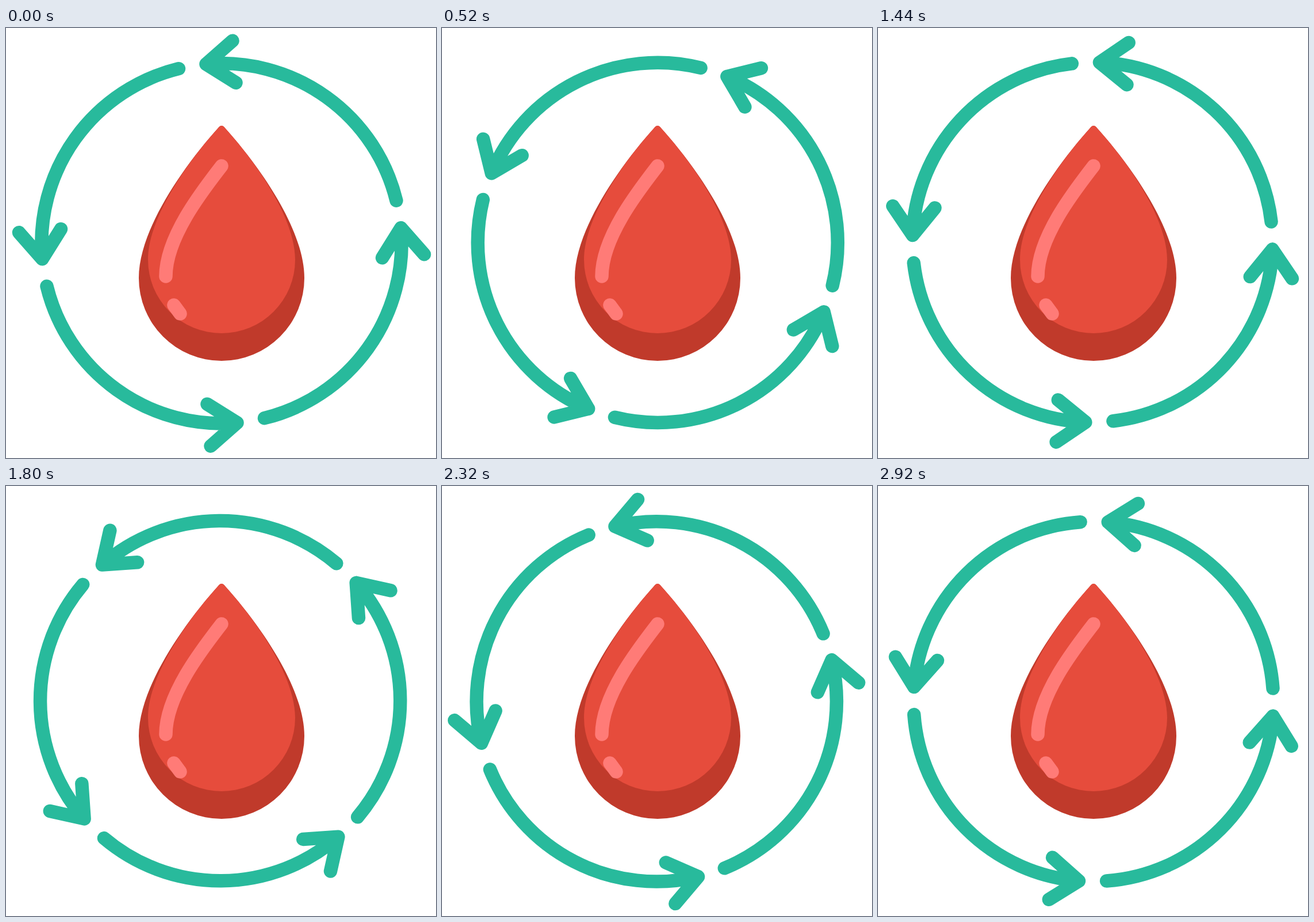
Animation of 748x748 px, one loop 2.96 s. Source, as an HTML page:

```html
<!DOCTYPE html>
<html lang="en">
<head>
<meta charset="utf-8">
<title>Blood circulation</title>
<style>
  html, body { margin: 0; width: 100%; height: 100%; overflow: hidden; background: #fff; }
  svg { display: block; width: 100vw; height: 100vh; }
  .line { fill: none; stroke-width: 23.5; stroke-linecap: round; stroke-linejoin: round; }
</style>
</head>
<body>
<svg viewBox="0 0 748 748">
  <g id="ring" class="line" stroke="#28ba9c"></g>
  <path fill="#c03a2b" d="M369 174Q375 166 381 174C430 228 519 345 519 435A144 144 0 0 1 231 435C231 345 320 228 369 174Z"/>
  <path fill="#e64c3c" d="M369 174Q375 166 381 174C430 228 503 328 503 403A128 128 0 0 1 247 403C247 328 320 228 369 174Z"/>
  <g class="line" stroke="#ff7b77">
    <path d="M375 240C340 285 278 365 278 432"/>
    <path d="M292 482L303 497"/>
  </g>
</svg>
<script>
  const LOOP = 2960, STEP = 40, TURN = 360 / 75;
  const ring = document.getElementById('ring');

  // One arrow around the ring's own centre, repeated at quarter turns
  const arrow = 'M304-74.5A313 313 0 0 0-27-312M19-352.5L-27-312L25-279.5';
  for (let i = 0; i < 4; i++) {
    const path = document.createElementNS('http://www.w3.org/2000/svg', 'path');
    path.setAttribute('d', arrow);
    path.setAttribute('transform', `rotate(${i * 90})`);
    ring.append(path);
  }

  const start = performance.now();
  function draw() {
    const t = (performance.now() - start) % LOOP;
    const angle = -TURN * Math.floor(t / STEP);
    // The ring sits slightly off the pivot, so it wobbles as it turns
    ring.setAttribute('transform', `translate(374 373.8) rotate(${angle}) translate(1 .9)`);
    requestAnimationFrame(draw);
  }
  draw();
</script>
</body>
</html>
```
